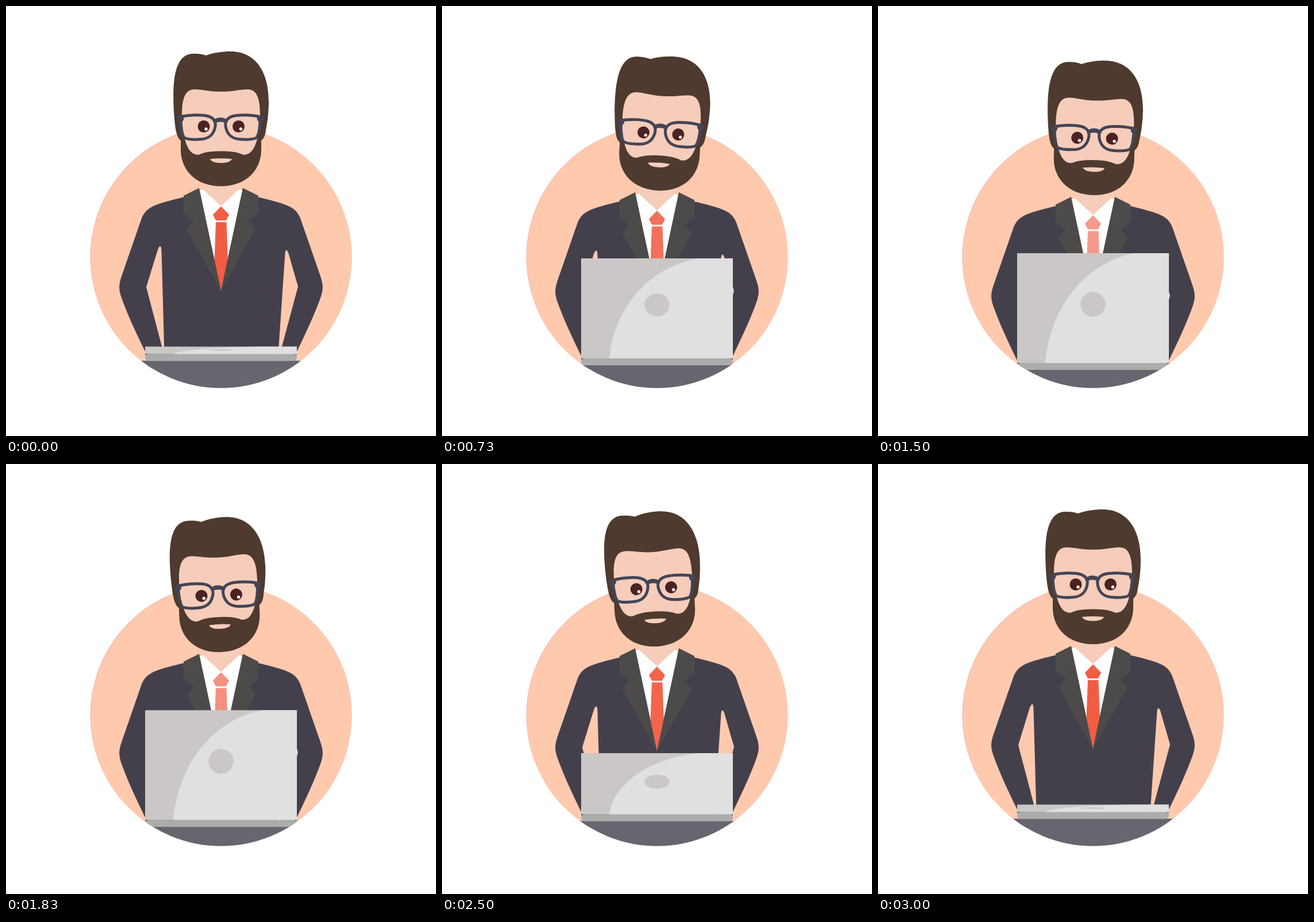
An HTML page that plays this animation: 748 by 748 pixels, repeating every 3030 ms.

```html
<!DOCTYPE html>
<html>
<head>
<meta charset="utf-8">
<style>
html, body { margin: 0; height: 100%; overflow: hidden; background: #fff; }
svg { display: block; width: 100%; height: 100%; }
</style>
</head>
<body>
<svg viewBox="0 0 748 748">
  <defs>
    <clipPath id="disc"><circle cx="374" cy="437" r="227.500"/></clipPath>
    <path id="lapel" d="M336 316.500L309 330 308.500 360 326 373.500 314 388 374 495Z"/>
    <g id="lens">
      <path d="M304 193C316 189.500 340 188.500 351 191.500 362 194.500 366 202 363.500 212 360 226 351 232 335 232 327 232.500 318 232 312 230 306 228 303.500 208 304 193Z" fill="none" stroke="#434557" stroke-width="5"/>
      <path d="M297 192L310 189 309 198 304 204 300 202Z" fill="#434557"/>
    </g>
  </defs>

  <g clip-path="url(#disc)">
    <circle cx="374" cy="437" r="228" fill="#fbb9b2"/>
    <circle cx="375.200" cy="438" r="227.500" fill="#ffc9ae"/>
    <g id="body">
      <path d="M242 598L236 618H512L506 598Z" fill="#f7cdb9"/>
      <path fill="#43404c" fill-rule="evenodd" d="M312 332C290 337 271 342 260 346.500 246 352 239 360 235 372L201 470C196 485 196 492 200 505 210 534 226 568 242 601V607H506V601C522 568 538 534 548 505 552 492 552 485 547 470L513 372C509 360 502 352 488 346.500 477 342 458 337 436 332L374 360Z
        M244 489L264 424Q269.500 411 270.500 425L275.500 607H275Z
        M508 488L491 429Q487 420 485.500 430L473.500 607H476Z"/>
      <path d="M343 295H405V320L374 349 343 320Z" fill="#f6cdba"/>
      <path d="M336.500 321L342.500 319 374 348 405.500 319 411.500 321 374 495Z" fill="#fff"/>
      <path id="tie" d="M374 348.500L360 363 365 373H383L388 363ZM365 376H383.500L386 443 374 495 362.500 443Z"/>
      <g fill="#4d4a4a">
        <use href="#lapel"/>
        <use href="#lapel" transform="matrix(-1 0 0 1 748 0)"/>
      </g>
      <rect x="140" y="617" width="468" height="80" fill="#686570"/>
      <rect x="242" y="605.500" width="264" height="12" rx="6" fill="#abadab"/>
      <g id="lid">
        <rect x="242" y="-191" width="264" height="191" rx="1" fill="#cac7c6"/>
        <path d="M291 0C298 -92 357 -174 446 -191H505Q506 -191 506 -190V0Z" fill="#e0e0e0"/>
        <circle cx="374" cy="-102" r="21.700" fill="#cac7c6"/>
      </g>
    </g>
  </g>

  <g id="head">
    <path fill="#4e3a2f" d="M304 234C296 228 294 212 292 184 289 130 293 83 326 83 334 83 341 83.500 348 86 362 81 376 79 390 79 438 79 457 120 457 165 457 190 454 206 452 216 451 226 448 231 444 234V250C444 285 418 313.500 374 313.500 330 313.500 304 285 304 250Z"/>
    <path fill="#f6cdba" d="M306 190C306 162 311 145 328 145 342 145 352 149 374 149 396 149 406 145 420 145 437 145 442 162 442 190 442 210 439 226 435 238 430 252 423 260 412 258.500 402 254 390 252.500 374 252.500 358 252.500 346 254 336 258.500 325 260 318 252 313 238 309 226 306 210 306 190Z"/>
    <path fill="#f6cdba" d="M355 266Q374 264 393 266 390 273 374 273 358 273 355 266Z"/>
    <g id="eyes">
      <g fill="#4a2222"><circle cx="344" cy="209.500" r="10.500"/><circle cx="404.500" cy="209.500" r="10.500"/></g>
      <g fill="#fff"><circle cx="348" cy="214" r="2.700"/><circle cx="408.500" cy="214" r="2.700"/></g>
    </g>
    <g id="glasses">
      <use href="#lens"/>
      <use href="#lens" transform="matrix(-1 0 0 1 746 0)"/>
      <path d="M360 201Q363 194 373 194 383 194 386 201L382 205Q380 201.500 373 201.500 366 201.500 364 205Z" fill="#434557"/>
    </g>
  </g>
</svg>
<script>
const el = id => document.getElementById(id);
const move = (id, value) => el(id).setAttribute('transform', value);
const swing = x => (1 - Math.cos(Math.PI * x)) / 2;
const STEP = 100 / 3, TILT = 4.3, RIGHT = 1030, LEFT = 2230, END = 3000;

// Eases in and out symmetrically around the midpoint.
function ease(x) {
  const p = 2.42;
  return x >= 1 ? 1 : x < .5 ? (2 * x) ** p / 2 : 1 - (2 - 2 * x) ** p / 2;
}

function tilt(t) {
  if (t < RIGHT) return TILT * swing(t / RIGHT);
  if (t < LEFT) return TILT * (1 - 2 * swing((t - RIGHT) / (LEFT - RIGHT)));
  return TILT * (swing((t - LEFT) / (END - LEFT)) - 1);
}

function draw(now) {
  const t = Math.min(90, Math.floor((now % 3030 + 3.4) / STEP)) * STEP;
  const sink = swing(t / 1500), dy = 15.5 * sink;
  const open = ease(Math.min(t, END - t) / 980);
  const fade = sink ** 1.5;

  move('body', `translate(0 ${dy})`);
  move('lid', `translate(0 605.500) scale(1 ${.068 + .932 * open})`);
  move('head', `translate(0 ${dy}) rotate(${tilt(t)} 374 320)`);
  move('glasses', `translate(0 ${3.2 * open})`);
  move('eyes', `translate(0 ${5 * open})`);
  el('tie').setAttribute('fill', `rgb(${241 + 4 * fade},${93 + 61 * fade},${67 + 73 * fade})`);
}

const start = performance.now();
function loop() {
  draw(performance.now() - start);
  requestAnimationFrame(loop);
}
loop();
</script>
</body>
</html>
```
